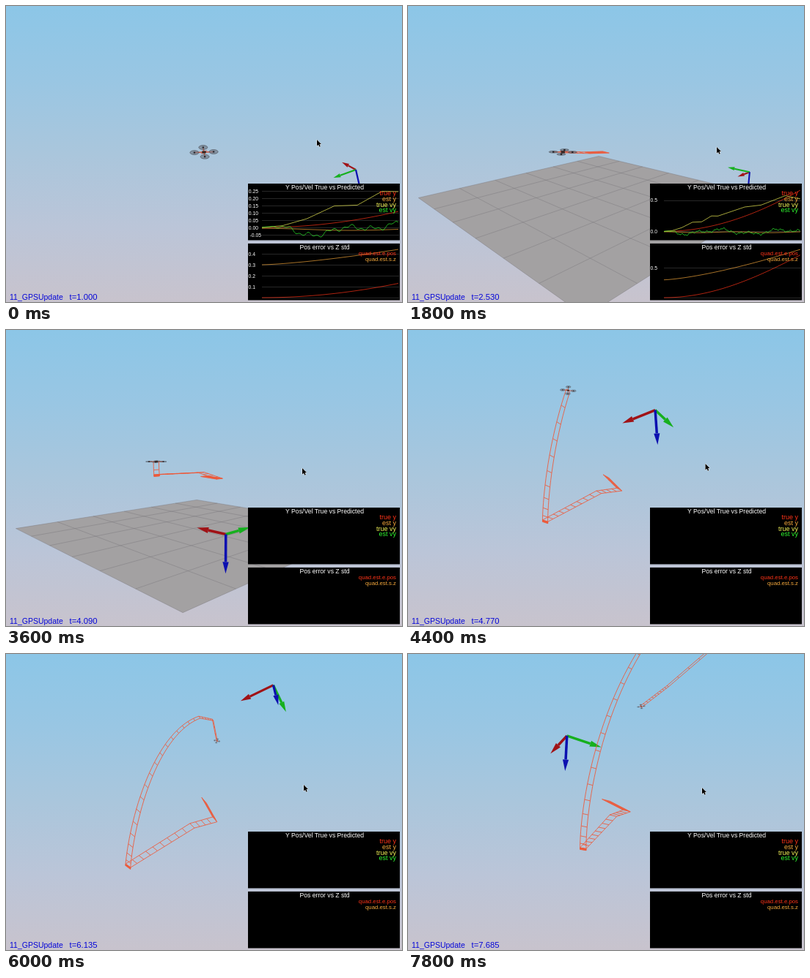
Write an HTML page with a canvas that moves like this. It is 540x405 px and loops after 8 s.

```html
<!DOCTYPE html>
<html lang="en">
<head>
<meta charset="utf-8">
<title>Quadrotor estimation</title>
<style>
  html, body { margin: 0; width: 100%; height: 100%; overflow: hidden; }
  canvas { display: block; }
</style>
</head>
<body>
<canvas id="stage" width="540" height="405"></canvas>
<script>
const ctx = document.getElementById('stage').getContext('2d');
const LOOP = 8000, STEP = 200;
const FONT = '"Liberation Sans", Arial, sans-serif';
const { sin, cos, abs, min, max, PI } = Math;
const clamp01 = v => max(0, min(1, v));

// Blend rows of [time, ...values] linearly.
function sample(rows, t) {
  let i = 0;
  while (i < rows.length - 2 && t > rows[i + 1][0]) i++;
  const a = rows[i], b = rows[i + 1], u = clamp01((t - a[0]) / (b[0] - a[0]));
  return a.map((v, k) => v + (b[k] - v) * u);
}

function path(points, close) {
  ctx.beginPath();
  points.forEach(([x, y]) => ctx.lineTo(x, y));
  if (close) ctx.closePath();
}

function strokePath(points) {
  path(points);
  ctx.stroke();
}

function text(str, x, y, size, color, align = 'left') {
  ctx.font = `${size}px ${FONT}`;
  ctx.textAlign = align;
  ctx.fillStyle = color;
  ctx.fillText(str, x, y);
}

// ---- scene: x north, y east, z up, measured from the take-off point ----
const ORIGIN = [-4.5, -3.96, -.87];
const GROUND = { x: -3.6, y: -4, half: 3.3, tiles: 6, azimuth: 45 };
const FOCAL = 489, DISTANCE = 14.7;

// time, simulated time, azimuth, pitch (positive looks down), ground depth, pointer x, y
const views = [
  [0, 1, 130, -29, .87, 424, 183],
  [1.8, 2.53, 132, 13, 0, 421, 193],
  [2.8, 3.39, 47, 7, .87, 403, 190],
  [3.6, 4.09, 46.5, 5.5, .87, 404, 189],
  [5.2, 5.45, 60, -55, .87, 407, 177],
  [6.8, 6.82, 60, -30, .87, 405, 181],
  [7.8, 7.685, 32, -24, .87, 401, 183]
];

// time, x, y, z
const waypoints = [
  [0, 0, 0, 0], [1.4, .1, 1.1, -.2], [1.8, 1.3, 1.2, 0], [2.7, 5.4, 1.9, -.4], [3.3, 5.4, 1.9, -.5],
  [5.2, 9.5, 15.2, 32], [5.7, 11.5, 23, 42.5], [6.3, 13.4, 29.3, 39], [6.8, 21.6, 25.2, 34.2],
  [7.8, 20.2, 18.4, 26.3]
];

function flight(t) {
  if (t < 3.3 || t > 5.2) return sample(waypoints, t).slice(1);
  const p = (t - 3.3) / 1.9; // accelerating climb
  return [5.4 + 4.1 * p ** 2, 1.9 + 13.3 * p ** 3, -.5 + 32.5 * p ** 2];
}

// Orbit camera aimed at the take-off point; returns [x, y, pixels per unit].
function makeCamera(azimuth, pitch) {
  const ca = cos(azimuth * PI / 180), sa = sin(azimuth * PI / 180);
  const cp = cos(pitch * PI / 180), sp = sin(pitch * PI / 180);
  return ([x, y, z]) => {
    const ahead = ca * x + sa * y;
    const scale = FOCAL / (DISTANCE + cp * ahead - sp * z);
    return [270 + (ca * y - sa * x) * scale, 200 - (sp * ahead + cp * z) * scale, scale];
  };
}

function drawSky() {
  const g = ctx.createLinearGradient(0, 0, 0, 405);
  ['#8cc6e7', '#99c6e3', '#aac6dc', '#bbc5d8', '#c8c3cd'].forEach((c, i) => g.addColorStop(i / 4, c));
  ctx.fillStyle = g;
  ctx.fillRect(0, 0, 540, 405);
}

function drawGround(pitch, depth) {
  if (DISTANCE * sin(pitch * PI / 180) + depth <= 0) return; // seen from below
  const project = makeCamera(GROUND.azimuth, pitch), { half, tiles } = GROUND;
  const at = (u, v) => project([GROUND.x + u * half, GROUND.y + v * half, -depth]);
  path([at(1, 1), at(1, -1), at(-1, -1), at(-1, 1)], true);
  ctx.fillStyle = '#a3a1a2';
  ctx.fill();
  ctx.strokeStyle = 'rgba(118,116,120,.6)';
  ctx.lineWidth = .7;
  for (let i = 0; i <= tiles; i++) {
    const u = 2 * i / tiles - 1;
    strokePath([at(u, -1), at(u, 1)]);
    strokePath([at(-1, u), at(1, u)]);
  }
}

function drawArrow([x0, y0, scale], [x1, y1], color) {
  const len = Math.hypot(x1 - x0, y1 - y0), size = scale / 56, head = min(16 * size, len * .6);
  ctx.save();
  ctx.translate(x0, y0);
  ctx.rotate(Math.atan2(y1 - y0, x1 - x0));
  ctx.fillStyle = color;
  ctx.fillRect(0, -1.8 * size, len - head, 3.6 * size);
  path([[len, 0], [len - head, -4.2 * size], [len - head, 4.2 * size]], true);
  ctx.fill();
  ctx.restore();
}

function drawAxes(project) {
  const [x, y, z] = ORIGIN, from = project(ORIGIN);
  drawArrow(from, project([x + 1, y, z]), '#a01216');
  drawArrow(from, project([x, y + 1, z]), '#16b01e');
  drawArrow(from, project([x, y, z - 1]), '#0c10b0');
}

// A ladder left behind the vehicle, its rungs pointing east.
function drawTrail(project, t) {
  const count = Math.round(t / .05), rails = [-.19, .19].map(side =>
    Array.from({ length: count + 1 }, (_, i) => {
      const [x, y, z] = flight(i * .05);
      return project([x, y + side, z]);
    }));
  ctx.strokeStyle = '#ee5838';
  ctx.lineWidth = .85;
  rails.forEach(strokePath);
  for (let i = 0; i <= count; i += 2) strokePath([rails[0][i], rails[1][i]]);
}

function drawDrone(project, t, pitch) {
  const [x, y, z] = flight(t), [cx, cy, scale] = project([x, y, z]);
  const arm = .28, radius = .18 * scale, flat = max(.12, abs(sin(pitch * PI / 180)));
  const rotors = [[1, 1], [1, -1], [-1, 1], [-1, -1]]
    .map(([dx, dy]) => project([x + dx * arm, y + dy * arm, z]));
  ctx.strokeStyle = '#d4553a';
  ctx.lineWidth = .045 * scale;
  for (const r of rotors) strokePath([[cx, cy], r]);
  ctx.lineWidth = .02 * scale;
  ctx.strokeStyle = '#4c5058';
  for (const [px, py] of rotors) {
    ctx.beginPath();
    ctx.ellipse(px, py, radius, radius * flat, 0, 0, 2 * PI);
    ctx.fillStyle = 'rgba(110,118,130,.65)';
    ctx.fill();
    ctx.stroke();
    ctx.fillStyle = '#25252a';
    ctx.fillRect(px - radius / 5, py - radius / 6, radius / 2.5, radius / 3);
  }
  ctx.fillStyle = '#3a2826';
  ctx.fillRect(cx - .08 * scale, cy - .05 * scale, .16 * scale, .1 * scale);
}

// ---- plots, as functions of simulated time ----
const speedPoints = [[0, 0], [.15, .012], [.33, .06], [.53, .147], [.7, .153], [.88, .247], [1, .245],
  [1.5, .39], [1.8, .42], [2.25, .57], [2.8, .47], [3.4, .35]];
const trueVel = s => sample(speedPoints, s)[1];
const truePos = s => .111 * s ** 2 / (1 + .0125 * s ** 2);
const estPos = s => -.006 - .014 * sin(s * 2.4) ** 2;
const estVel = s => min(1, s * 4) * (.03 * sin(5.2 * s + 2.6) + .02 * sin(13 * s)
  + .012 * sin(41 * s) + .008 * sin(97 * s) - .005);
const posError = s => .134 * s ** 2 / (1 + .03 * s ** 2);
const zStd = s => .3 + .14 * s ** 1.4;

const RED = '#ff3418', ORANGE = '#f5a83c', YELLOW = '#f4f458', GREEN = '#30f830';
const plots = [
  { top: 243, zone: [252, 317], title: 'Y Pos/Vel True vs Predicted', legendSize: 9,
    series: [['true y', RED, truePos], ['est y', ORANGE, estPos], ['true vy', YELLOW, trueVel], ['est vy', GREEN, estVel]],
    range: t => [-.07 - .03 * clamp01(t - 1), max(.255, truePos(t), trueVel(min(t, 2.25)))],
    tick: top => top < .35 ? .05 : top < .5 ? .1 : .5 },
  { top: 325, zone: [333, 399], title: 'Pos error vs Z std', legendSize: 7.8,
    series: [['quad.est.e.pos', RED, posError], ['quad.est.s.z', ORANGE, zStd]],
    range: t => [0, max(posError(t), zStd(t))],
    tick: top => top < .6 ? .1 : .5 }
];

function drawPlotData({ range, tick, zone, series }, t) {
  const [low, high] = range(t), step = tick(high);
  const toY = v => zone[1] - (v - low) / (high - low) * (zone[1] - zone[0]);
  for (let i = Math.ceil(low / step); i * step <= high; i++) {
    const v = i * step, y = toY(v);
    ctx.fillStyle = '#272727';
    ctx.fillRect(349, Math.round(y), 187, 1);
    if (v === low) continue;
    text(v.toFixed(step < .1 ? 2 : 1), v < 0 ? 348 : step < .1 ? 344 : 340, y + 2.5, 6.8, '#fff', 'right');
  }
  ctx.lineWidth = .8;
  ctx.globalAlpha = .85;
  for (const [, color, f] of series) {
    ctx.strokeStyle = color;
    strokePath(Array.from({ length: 187 }, (_, i) => [349 + i, toY(f(t * i / 186))]));
  }
  ctx.globalAlpha = 1;
}

function drawPlot(plot, t, active) {
  ctx.fillStyle = '#000';
  ctx.fillRect(330, plot.top, 207, 77.5);
  if (active) drawPlotData(plot, t);
  text(plot.title, 434.5, plot.top + 8, 8.65, '#fff', 'center');
  plot.series.forEach(([name, color], i) =>
    text(name, 532, plot.top + 16 + i * 7.8, plot.legendSize, color, 'right'));
}

function drawPointer(x, y) {
  path([[0, 0], [0, 8.5], [2, 6.7], [3.4, 9.8], [4.8, 9.1], [3.5, 6.2], [6, 6]]
    .map(([dx, dy]) => [x + dx, y + dy]), true);
  ctx.strokeStyle = '#fff';
  ctx.lineWidth = 1;
  ctx.stroke();
  ctx.fillStyle = '#000';
  ctx.fill();
}

function render(t) {
  const [, sim, azimuth, pitch, depth, pointerX, pointerY] = sample(views, t);
  const project = makeCamera(azimuth, pitch);
  drawSky();
  drawGround(pitch, depth);
  drawAxes(project);
  drawTrail(project, t);
  drawDrone(project, t, pitch);
  for (const plot of plots) drawPlot(plot, sim, t < 3.2);
  text('11_GPSUpdate', 5, 401.5, 10.5, '#0808d8');
  text('t=' + sim.toFixed(3), 86.5, 401.5, 11.3, '#0808d8');
  drawPointer(pointerX, pointerY);
}

function loop() {
  render(Math.floor(performance.now() % LOOP / STEP) * STEP / 1000);
  requestAnimationFrame(loop);
}
loop();
</script>
</body>
</html>
```
